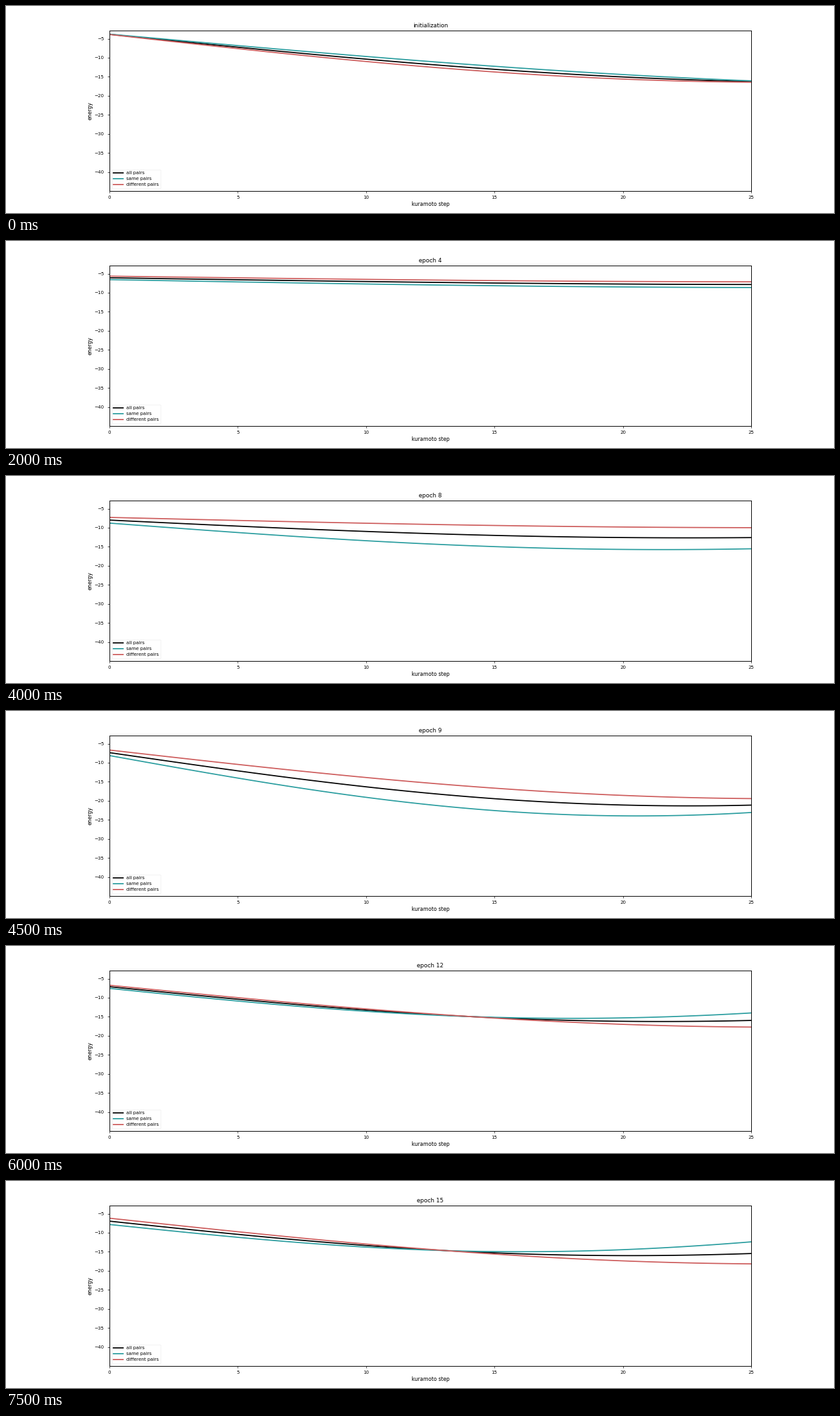
A matplotlib script that plays this animation: 1280x320 px, repeating every 8000 ms.

```python
import numpy as np
import matplotlib.pyplot as plt
from matplotlib.animation import FuncAnimation

plt.rcParams.update({
    "font.family": "DejaVu Sans",
    "font.size": 8,
    "axes.titlesize": 10,
    "axes.labelsize": 9,
    "axes.labelpad": 2.5,
    "axes.linewidth": 1.1,
    "lines.linewidth": 2,
    "xtick.major.pad": 5,
    "ytick.major.pad": 6,
    "figure.subplot.bottom": 0.107,
})

EPOCHS = 16
STEPS = np.linspace(0, 25, 101)
SAME_SHARE = 0.47

# Key epochs: depth at first and last step, same pairs then different pairs
KEYS = {
    0: (3.81, 16.08, 3.90, 16.43),
    4: (6.56, 8.50, 5.65, 7.00),
    6: (6.90, 13.10, 6.21, 10.05),
    8: (8.79, 15.53, 7.29, 9.99),
    10: (7.46, 15.28, 6.05, 13.51),
    12: (7.55, 14.00, 6.73, 17.71),
    15: (7.84, 12.39, 6.19, 18.17),
}


def bump(x, center, width):
    return np.exp(-((x - center) / width) ** 2)


def surge(epoch):
    """Extra final depth: an early plunge, then deeper odd epochs."""
    odd = epoch % 2
    return 47 * bump(epoch, 2.43, 0.65) + 9 * odd * bump(epoch, 9.8, 2)


def descent(start, end, angle):
    """Sine arc from start to end, past its trough if angle > pi/2."""
    arc = np.sin(angle * STEPS / STEPS[-1]) / np.sin(angle)
    return -(start + (end - start) * arc)


def energies(epoch):
    s0, s1, d0, d1 = (np.interp(epoch, list(KEYS), column)
                      for column in zip(*KEYS.values()))
    extra = surge(epoch)
    same = descent(s0, s1 + extra, 1.1 + 0.09 * epoch)
    diff = descent(d0, d1 + extra, 1.5)
    return SAME_SHARE * same + (1 - SAME_SHARE) * diff, same, diff


fig, ax = plt.subplots(figsize=(20, 5), dpi=64)
lines = [ax.plot(STEPS, np.zeros(len(STEPS)), color=color, label=label)[0]
         for label, color in [("all pairs", "black"),
                              ("same pairs", "#2a9d9f"),
                              ("different pairs", "#cd5c5c")]]
ax.set(xlim=(0, 25), ylim=(-44.97, -2.94),
       xticks=range(0, 26, 5), yticks=range(-40, 0, 5),
       xlabel="kuramoto step", ylabel="energy")
ax.legend(loc="lower left", edgecolor="0.93", labelspacing=0.42)
title = ax.set_title("")


def update(epoch):
    for line, values in zip(lines, energies(epoch)):
        line.set_ydata(values)
    title.set_text(f"epoch {epoch}" if epoch else "initialization")
    return [*lines, title]


anim = FuncAnimation(fig, update, frames=EPOCHS, interval=500,
                     repeat=True, repeat_delay=0)
plt.show()
```
